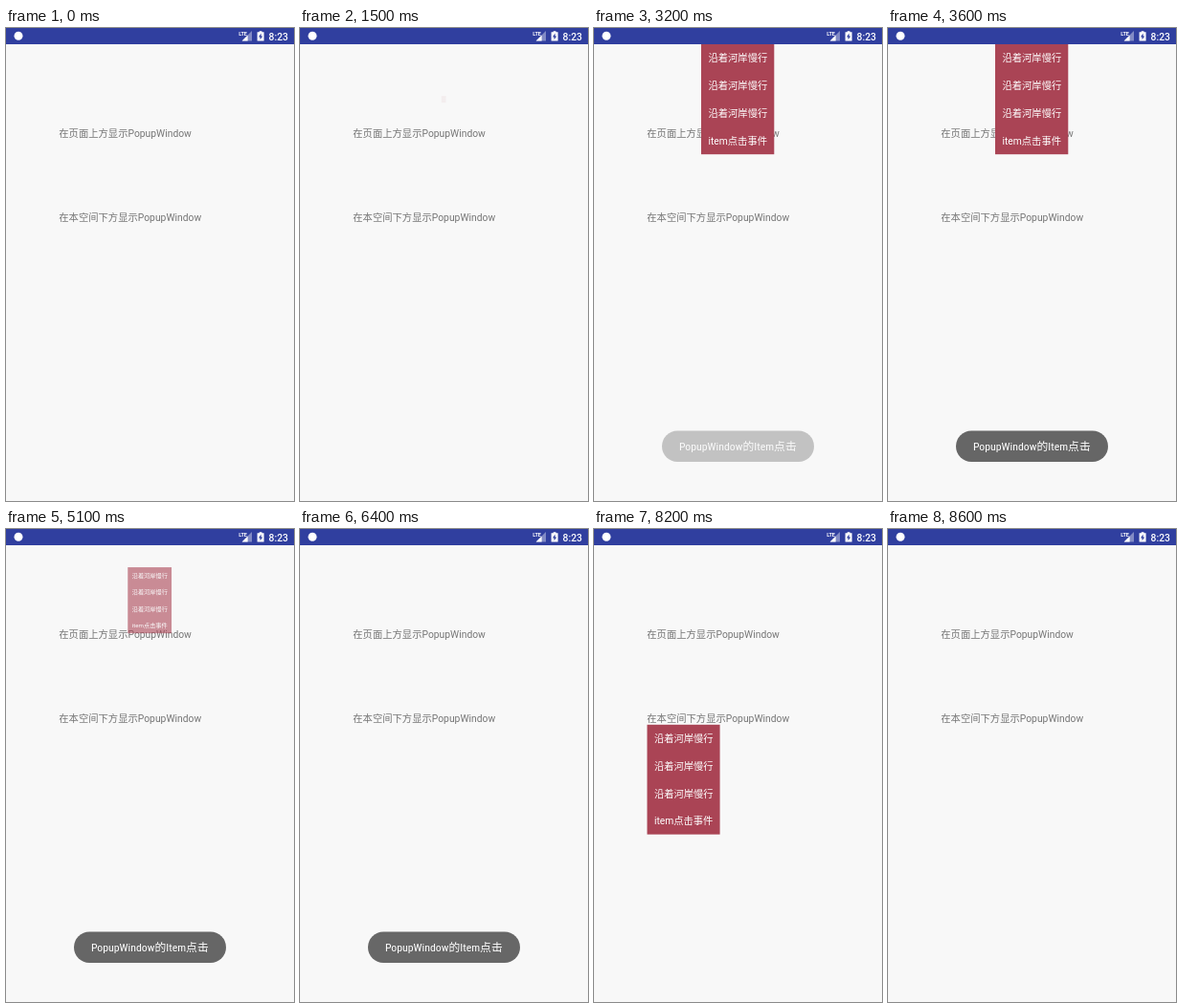
Write an HTML page that moves like this. It is 301 px wide and 495 px high and loops after 9500 ms.

```html
<!DOCTYPE html>
<html lang="zh-CN">
<head>
<meta charset="utf-8">
<title>PopupWindow</title>
<style>
  html, body { margin: 0; width: 100%; height: 100%; overflow: hidden; background: #f8f8f8; }
  svg { display: block; width: 301px; height: 495px; }
  text { font: 10.32px Roboto, "Noto Sans CJK SC", "Noto Sans CJK", sans-serif; fill: #757575; }
  .light, .light text { fill: #fff; }
  #toast text { font-size: 11.8px; font-family: "Roboto Condensed", Roboto, "Noto Sans CJK SC", "Noto Sans CJK", sans-serif; font-stretch: 75%; }
</style>
</head>
<body>
<svg viewBox="0 0 301 495">
  <defs>
    <g id="menu" class="light">
      <rect width="76.3" height="115.2" fill="#aa4455"/>
      <text x="7.4" y="18.4">沿着河岸慢行</text>
      <text x="7.4" y="47.2">沿着河岸慢行</text>
      <text x="7.4" y="76">沿着河岸慢行</text>
      <text x="7.4" y="104.8">item点击事件</text>
    </g>
  </defs>
  <rect width="301" height="495" fill="#f8f8f8"/>
  <rect width="301" height="17" fill="#303f9f"/>

  <g class="light">
    <circle cx="13" cy="8.2" r="4.5"/>
    <path d="M257 3V13.4H246.6Z" opacity=".4"/>
    <path d="M252.6 7.4V13.4H246.6Z"/>
    <text x="243.3" y="8" style="font-size:5.6px;font-weight:700;letter-spacing:-.3px">LTE</text>
    <path fill-rule="evenodd" d="M264.7 4.2V3.2H267.5V4.2H269.6V13.6H262.6V4.2ZM266.6 5.6L264 9.4H265.6V12.3L268.2 8.4H266.6Z"/>
    <text x="274.6" y="12.7" style="font-weight:500">8:23</text>
  </g>

  <text x="55.3" y="113.7">在页面上方显示PopupWindow</text>
  <text x="55.3" y="201.7">在本空间下方显示PopupWindow</text>
  <use id="top" href="#menu"/>
  <use id="below" href="#menu"/>
  <g id="toast" class="light">
    <rect x="71" y="421.5" width="159" height="32.4" rx="16.2" fill="#666"/>
    <text x="150.3" y="442" text-anchor="middle">PopupWindow的Item点击</text>
  </g>
</svg>
<script>
const LOOP = 9500, STEP = 100;
const $ = id => document.getElementById(id);
const progress = (t, start, length) => Math.min(1, Math.max(0, (t - start) / length));
const ease = p => (1 - Math.cos(Math.PI * p)) / 2;

function fade(el, alpha) {
  el.style.opacity = alpha;
  el.style.visibility = alpha < 0.01 ? 'hidden' : 'visible';
}

// Menus grow and shrink around their centre while fading.
function popup(el, x, y, t, opens, closes, gone) {
  const s = t >= gone ? 0 : ease(progress(t, opens, 500)) - ease(progress(t, closes, 500));
  el.setAttribute('transform',
    `translate(${x + 38.15 * (1 - s)} ${y + 57.6 * (1 - s)}) scale(${s})`);
  fade(el, s);
}

function draw(now) {
  const t = Math.floor(now % LOOP / STEP) * STEP;
  popup($('top'), 112, 17, t, 1420, 4882, 5300);
  popup($('below'), 55.4, 204.6, t, 6462, 8182, 8600);
  const shown = 1 - (1 - progress(t, 3120, 400)) ** 2;
  fade($('toast'), shown - progress(t, 6360, 400) ** 2);
}

let begin;
function tick(now) {
  begin ??= now;
  draw(now - begin);
  requestAnimationFrame(tick);
}
draw(0);
requestAnimationFrame(tick);
</script>
</body>
</html>
```
